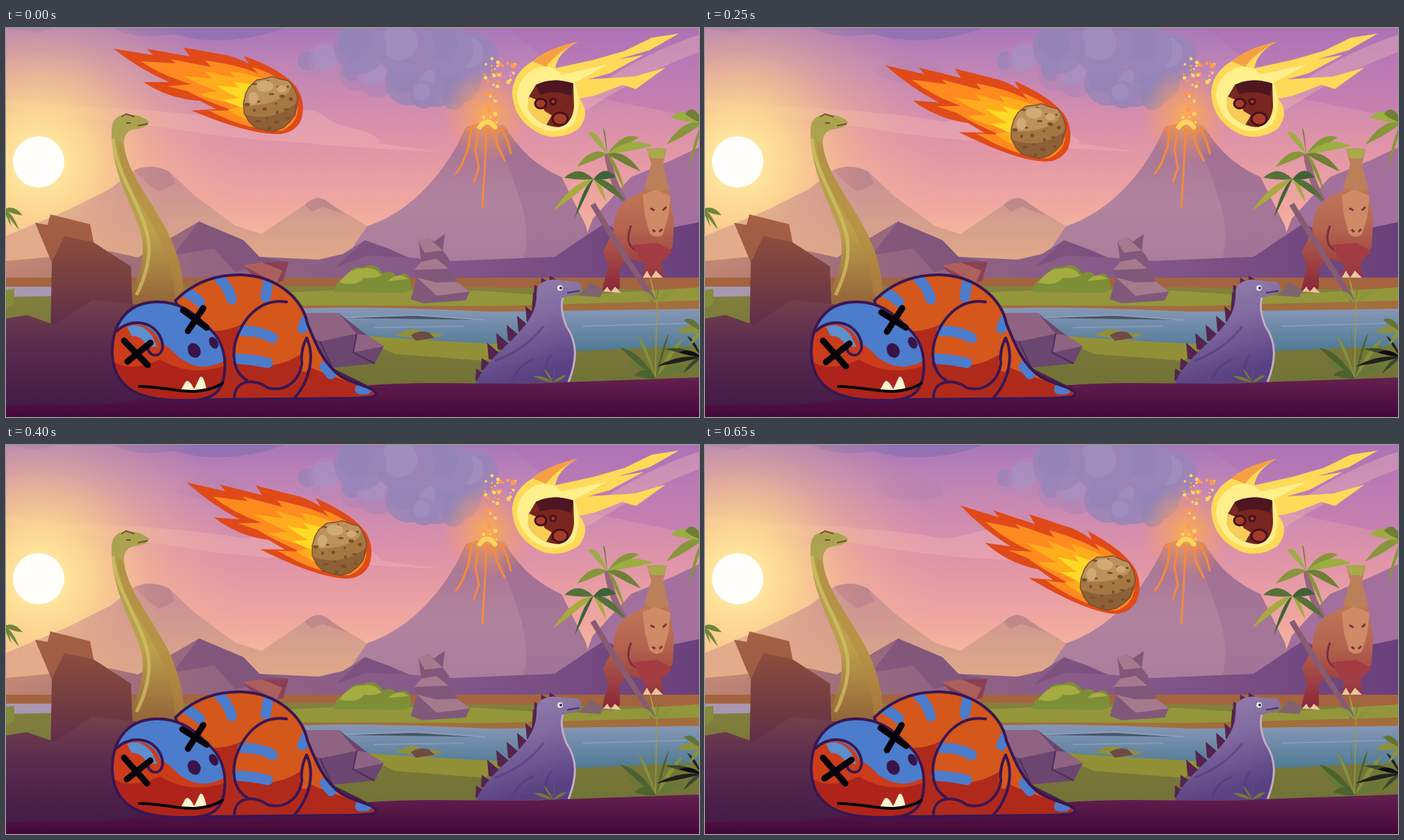
An HTML page for the animation above (750 ms loop, 998x561 px).

```html
<!DOCTYPE html>
<html lang="en">
<head>
<meta charset="utf-8">
<title>Last day of the dinosaurs</title>
<style>
html, body { margin: 0; width: 100%; height: 100%; overflow: hidden; background: #4a0b3e; }
svg { display: block; width: 100vw; height: 100vh; }
.line { fill: none; stroke: #3a1652; stroke-width: 4; stroke-linecap: round; stroke-linejoin: round; }
.stripe { fill: none; stroke: #4c7ccc; stroke-width: 15; stroke-linecap: round; }
.ink { fill: none; stroke: #050208; stroke-linecap: round; }
</style>
</head>
<body>
<svg viewBox="0 0 998 561" preserveAspectRatio="none">
<defs>
  <linearGradient id="sky" x2="0" y2="1">
    <stop offset="0" stop-color="#a878b8"/><stop offset=".1" stop-color="#c084b6"/>
    <stop offset=".3" stop-color="#e094a8"/><stop offset=".46" stop-color="#f0a8a0"/><stop offset=".6" stop-color="#f6c298"/>
  </linearGradient>
  <radialGradient id="glow">
    <stop offset="0" stop-color="#fff3b0"/><stop offset=".25" stop-color="#ffe094" stop-opacity=".85"/>
    <stop offset=".55" stop-color="#fbc888" stop-opacity=".4"/><stop offset="1" stop-color="#f6b090" stop-opacity="0"/>
  </radialGradient>
  <radialGradient id="fireGlow">
    <stop offset="0" stop-color="#ffb04a" stop-opacity=".9"/><stop offset="1" stop-color="#ff9a5a" stop-opacity="0"/>
  </radialGradient>
  <linearGradient id="far" x2="0" y2="1">
    <stop offset="0" stop-color="#c88e96"/><stop offset="1" stop-color="#e0aa88"/>
  </linearGradient>
  <linearGradient id="volcano" x2="0" y2="1">
    <stop offset="0" stop-color="#a7708f"/><stop offset=".55" stop-color="#b1839e"/><stop offset="1" stop-color="#a97d9c"/>
  </linearGradient>
  <linearGradient id="hill">
    <stop offset="0" stop-color="#bb8070"/><stop offset=".28" stop-color="#946680"/><stop offset=".6" stop-color="#85598a"/><stop offset="1" stop-color="#69407b"/>
  </linearGradient>
  <linearGradient id="river" x2="0" y2="1">
    <stop offset="0" stop-color="#8797b6"/><stop offset="1" stop-color="#4f7a94"/>
  </linearGradient>
  <linearGradient id="grass" x2="0" y2="1">
    <stop offset="0" stop-color="#85813f"/><stop offset="1" stop-color="#6f7135"/>
  </linearGradient>
  <linearGradient id="shade" x2="0" y2="1">
    <stop offset="0" stop-color="#73404c"/><stop offset=".4" stop-color="#592b4e"/><stop offset="1" stop-color="#3e1846"/>
  </linearGradient>
  <linearGradient id="cliff" x2="0" y2="1">
    <stop offset="0" stop-color="#97553f"/><stop offset=".5" stop-color="#79403f"/><stop offset="1" stop-color="#582b4d"/>
  </linearGradient>
  <linearGradient id="front" x2="0" y2="1">
    <stop offset="0" stop-color="#64204f"/><stop offset="1" stop-color="#43083b"/>
  </linearGradient>
  <linearGradient id="neck" x2="0" y2="1">
    <stop offset="0" stop-color="#a9a350"/><stop offset=".6" stop-color="#bca04d"/><stop offset="1" stop-color="#916037"/>
  </linearGradient>
  <linearGradient id="spiny" x2=".3" y2="1">
    <stop offset="0" stop-color="#9a83b0"/><stop offset=".5" stop-color="#806a9f"/><stop offset="1" stop-color="#594083"/>
  </linearGradient>
  <linearGradient id="brute" x2="0" y2="1">
    <stop offset="0" stop-color="#c98a5a"/><stop offset=".55" stop-color="#b66450"/><stop offset="1" stop-color="#8a2638"/>
  </linearGradient>
  <clipPath id="headClip"><path id="headShape" d="M153 470C152 430 172 396 216 395C249 394 270 410 289 430C307 444 317 466 315 494C313 523 300 536 266 537C214 538 156 533 153 470Z"/></clipPath>
  <clipPath id="bodyClip"><path id="bodyShape" d="M244 393C273 364 307 355 340 356C391 358 427 391 434 426C447 459 459 486 482 502C500 514 532 518 533 527C533 535 510 533 490 534L290 536Z"/></clipPath>
  <clipPath id="rockClip"><path id="rockShape" d="M-31-24L-20-34L-8-36L2-39L15-35L26-33L34-22L39-10L38 4L35 17L27 27L18 35L4 40L-9 38L-22 35L-31 26L-38 14L-39 0L-36-14Z"/></clipPath>
</defs>

<!-- sky -->
<rect width="998" height="561" fill="url(#sky)"/>
<path d="M998 0V130L850 100L720 0Z" fill="#b36bb0" opacity=".38"/>
<g fill="#f7c0b8" opacity=".32">
  <path d="M0 104C120 118 260 112 420 150L620 178C430 172 190 140 0 112Z"/>
  <path d="M190 135C230 120 300 140 350 134S430 105 460 128S520 140 540 165C440 170 300 160 190 135Z"/>
  <path d="M825 105C875 60 950 25 998 10V35C940 55 880 90 825 125Z"/>
</g>
<path d="M155 0C190 18 220 10 245 9C290 25 360 17 400 0ZM0 0H70L45 7Z" fill="#8c6faf" opacity=".75"/>
<path d="M245 68C250 48 270 52 276 38C290 24 315 34 315 50C330 46 344 58 343 72C315 86 270 80 245 68Z" fill="#b882b0" opacity=".6"/>
<circle cx="47" cy="193" r="290" fill="url(#glow)"/>
<g id="smoke"></g>

<!-- mountains -->
<path d="M0 300L90 262L150 232L185 205Q210 194 235 207L272 242L330 285L368 297L430 255Q449 236 468 254L520 286L560 340H0Z" fill="url(#far)"/>
<path d="M185 205Q210 194 235 207L244 225L220 236L203 224ZM430 255Q449 236 468 254L490 270L456 258L440 265Z" fill="#b57c88" opacity=".55"/>
<path d="M480 345L520 286C590 262 638 200 662 143Q690 132 718 141C740 178 767 201 800 215L835 285L850 345Z" fill="url(#volcano)"/>
<path d="M718 141C740 178 767 201 800 215L835 285L850 345H740C770 280 720 210 708 148Z" fill="#94658f" opacity=".4"/>
<path d="M820 340L845 275L900 215L960 190L998 172V345Z" fill="#a3709d"/>
<circle cx="693" cy="125" r="68" fill="url(#fireGlow)"/>
<g fill="none" stroke="#f58a3c" stroke-width="3" stroke-linecap="round">
  <path d="M664 147Q678 135 691 145T718 144M670 147L666 172L657 196L648 210M681 144L676 176L681 202L674 222M692 146L690 190L686 258M703 146L707 168L718 191M714 146L722 162L727 181"/>
  <path d="M682 143Q693 128 704 143" stroke="#ffd45a" stroke-width="7"/>
</g>
<g id="sparks"></g>
<path d="M0 336L150 322L190 331L242 300L278 279L342 306L365 330L450 334L485 326L517 306L550 318L580 331L645 336L790 330L830 303L862 282L900 300L998 280V372H0Z" fill="url(#hill)"/>
<path d="M278 279L342 306L365 330L400 336L330 352L300 318L240 328ZM517 306L550 318L580 331L520 328L475 345Z" fill="#6d4677" opacity=".45"/>
<circle cx="47" cy="193" r="190" fill="url(#glow)" opacity=".65"/>
<circle cx="47" cy="193" r="37" fill="#fffefa"/>

<!-- plain and river -->
<path d="M0 361H998V530H0Z" fill="url(#grass)"/>
<path d="M0 360H998V378L700 374L420 372L0 374Z" fill="#a4643f"/>
<path d="M0 373H90V386L0 388Z" fill="#a897b1"/>
<path d="M390 382L500 377L680 379L800 387L998 374V398L760 405L400 402Z" fill="#93963b"/>
<path d="M400 400L700 401L998 393V410L760 413L400 406Z" fill="#a26e3c"/>
<path d="M410 405C510 401 600 405 700 409L998 405V458L820 466C720 466 590 450 510 443L410 430Z" fill="url(#river)"/>
<path d="M470 418L590 414L690 421M530 432L660 430M830 430L980 426" stroke="#a2b4c8" stroke-width="2" opacity=".4"/>
<path d="M500 443C580 449 680 455 720 456L690 480L560 470ZM560 443L583 434L630 443L607 450Z" fill="#929037"/>
<path d="M583 443Q594 435 609 439L617 447L590 451Z" fill="#6d4c43"/>
<path d="M472 381Q475 360 490 361Q497 342 514 345Q532 336 543 354Q557 348 562 358Q579 348 582 364Q588 378 574 382Z" fill="#7e8e36"/>
<path d="M480 367Q495 346 514 347Q530 343 541 357Q530 362 516 360Q504 374 480 367ZM550 365Q565 350 580 362Z" fill="#a4ac42"/>
<path d="M583 391L592 360L588 349L598 337L594 308L608 302L616 308L632 297L629 321L638 333L637 347L650 366L668 380L662 393L600 397Z" fill="#80587a"/>
<path d="M594 308L608 302L629 321L603 324ZM598 337L620 333L637 347L588 349ZM592 360L620 367L650 366L668 380L620 386Z" fill="#a67a8d"/>
<path d="M340 342L369 338L407 337L399 365L370 371Z" fill="#8b4056"/><path d="M340 342L369 338L398 350L390 368Z" fill="#ac605e"/>
<path d="M409 418L430 411L479 411L520 443L544 459L531 484L470 490L400 486Z" fill="#6b4670"/>
<path d="M409 418L430 411L479 411L505 441L452 452L425 437ZM505 441L520 443L544 459L500 468Z" fill="#8f6482"/>
<path d="M452 452L470 490M505 441L500 468L531 484" fill="none" stroke="#4f2d5b" stroke-width="2"/>

<!-- left cliff and long neck -->
<path d="M173 403C181 371 201 350 196 304C189 267 151 214 152 148Q152 126 173 125Q191 123 206 135Q205 144 184 146Q168 150 170 169C174 209 213 254 233 295C252 334 257 365 257 405Z" fill="url(#neck)"/>
<path d="M170 169C174 209 213 254 233 295C252 334 257 365 257 405H244C244 344 222 302 197 260C177 228 162 196 160 162Z" fill="#b5863f" opacity=".5"/>
<path d="M154 160C158 211 196 255 205 305Q210 340 188 385" fill="none" stroke="#d8c465" stroke-width="5" opacity=".7"/>
<path d="M166 128L173 124L185 128M173 137H180M190 141L204 138" stroke="#6d5130" stroke-width="2" fill="none"/>
<path d="M42 281L60 284L64 269L121 283L126 309L180 344L182 398L170 445H64L66 338Z" fill="url(#cliff)"/>
<path d="M42 281L60 284L64 269L121 283L126 309L84 300L66 338Z" fill="#ad6848" opacity=".65"/>
<path d="M0 419L30 414L70 428L125 392L182 398L270 410L440 475L520 515V561H0Z" fill="url(#shade)"/>
<path d="M0 378L12 376L12 398L0 404Z" fill="#838c3a"/>

<!-- palms and horned dinosaur -->
<path d="M875 292Q873 262 898 245L920 234L929 196L923 174H951L946 196L955 235L962 278L960 316L943 335L947 357L917 359L920 340L900 333L884 344L884 376L858 380L867 344L860 322Z" fill="url(#brute)"/>
<path d="M917 241L935 233L957 242L954 271L946 298Q936 305 927 296L920 270Z" fill="#ce8b65"/>
<path d="M919 230L930 196L924 176Q938 170 951 176L946 197L955 232Q937 238 919 230Z" fill="#ba805a"/>
<path d="M923 176Q938 170 951 176L947 188H929Z" fill="#a9a84c"/>
<path d="M900 285Q888 318 915 323L934 318M875 300L888 322M928 260L934 263M951 258L946 263M931 291L935 294M945 290L941 294" fill="none" stroke="#7c303b" stroke-width="3"/>
<path d="M902 313L938 310L960 322L942 340L917 338Z" fill="#a43c43"/>
<path d="M860 380L866 373L871 381L877 373L886 382ZM917 360L923 350L929 360L936 350L946 360Z" fill="#ecc6a2"/>
<path d="M845 254Q875 305 933 393" fill="none" stroke="#875c72" stroke-width="8"/>
<path d="M866 181Q872 222 890 249" fill="none" stroke="#93667a" stroke-width="9"/>
<path d="M825 386L842 367L860 378L856 388Z" fill="#80636f"/>
<g id="palms"></g>

<!-- spiny dinosaur -->
<g id="spines" fill="#54244e"></g>
<path d="M676 514C694 473 730 456 753 421C767 400 763 384 765 374Q776 359 799 364L824 366Q833 374 824 383L802 389Q797 405 807 430C824 455 822 480 810 511Z" fill="url(#spiny)"/>
<path d="M802 389Q797 405 807 430C824 455 822 480 810 511" fill="none" stroke="#c2acc3" stroke-width="3"/>
<path d="M704 480Q748 464 774 430M730 508Q738 485 760 478M778 508Q773 485 786 470" fill="none" stroke="#513a79" stroke-width="3" opacity=".55"/>
<circle cx="798" cy="375" r="4" fill="#dff0e4"/><circle cx="799" cy="375" r="2" fill="#27324a"/>
<path d="M808 382L826 379" stroke="#4a2f60" stroke-width="2"/>
<g id="plants"></g>

<!-- foreground -->
<path d="M0 545C70 540 120 548 180 538C330 525 480 519 540 514C640 509 700 516 800 511L998 504V561H0Z" fill="url(#front)"/>

<!-- sleeping dinosaur -->
<use href="#bodyShape" fill="#d4571c"/>
<g clip-path="url(#bodyClip)">
  <path d="M290 437Q319 438 340 427L329 475Q380 500 425 470L440 490Q475 506 533 521V540H290Z" fill="#b02a1c"/>
  <path d="M392 397C350 396 331 430 329 470Q380 507 428 462L434 420Z" fill="#d4571c"/>
  <path class="stripe" d="M252 379Q268 383 279 395M306 360Q321 374 325 391M378 365L374 388M341 437Q365 436 384 447M333 477Q355 478 377 483M432 421L427 433M459 488L468 499M510 521H519"/>
  <ellipse cx="430" cy="484" rx="7" ry="12" fill="#d4571c"/>
</g>
<use href="#bodyShape" class="line"/>
<path class="line" d="M404 395C366 389 340 419 330 454C324 482 333 500 347 508M329 533C329 508 357 504 377 519C404 526 423 507 426 484Q424 464 433 447M433 447C445 473 438 508 415 534"/>
<use href="#headShape" fill="#cb3c1b"/>
<g clip-path="url(#headClip)">
  <path d="M150 478Q176 499 222 478Q266 505 318 486V540H150Z" fill="#ae241a"/>
  <path d="M150 440C153 390 218 374 263 404C300 428 322 454 314 480Q280 499 249 475Q232 457 222 454C210 423 177 420 150 440Z" fill="#4c7ccc"/>
  <path d="M174 431Q195 423 211 445L218 460L203 459Q196 444 181 444Z" fill="#5b8fd0"/>
</g>
<use href="#headShape" class="line"/>
<path class="line" d="M160 437C177 419 210 421 222 445C231 464 221 475 211 471Q201 466 207 457"/>
<ellipse cx="271" cy="465" rx="9" ry="11" transform="rotate(-28 271 465)" fill="#391449"/>
<ellipse cx="299" cy="454" rx="6" ry="9" transform="rotate(-28 299 454)" fill="#391449"/>
<path d="M251 524L258 511Q263 504 271 521L279 504Q284 498 289 522Z" fill="#fff4d2"/>
<path class="ink" stroke-width="4" d="M192 517C225 517 245 525 272 524Q298 522 312 512"/>
<path id="crosses" class="ink" stroke-width="9"/>

<!-- distant meteor -->
<path d="M729 94C730 62 757 45 780 40Q796 25 823 20Q795 35 791 58L846 46L891 33L930 14L969 8L927 32L882 45L918 39L870 65L838 74L905 70L950 57L907 88L888 82L849 97L826 102Q843 124 824 146Q789 168 758 146Q731 128 729 94Z" fill="#ffda58"/>
<path d="M736 96Q737 71 763 58Q786 51 800 67L866 53L819 79Q831 111 817 139Q790 157 763 141Q738 124 736 96Z" fill="#fff08c"/>
<path d="M758 48Q780 29 823 20Q790 38 778 56" fill="#f6a044"/>
<path d="M763 82Q787 70 817 80L818 113Q816 138 797 143Q772 142 761 126Q751 110 753 99Z" fill="#792520"/>
<path d="M763 82Q787 70 817 80L814 98Q791 88 769 96Z" fill="#4d1620"/>
<path d="M753 99L768 105L776 120L786 126L778 140Q756 131 751 114Z" fill="#f7cc57"/>
<g fill="#a53c2a" stroke="#43121c" stroke-width="3"><ellipse cx="798" cy="131" rx="11" ry="9"/><ellipse cx="770" cy="109" rx="8" ry="7"/><circle cx="788" cy="106" r="4"/></g>

<!-- falling meteor -->
<g id="meteor">
  <path d="M-226-79L-169-70L-178-79L-116-68L-126-81L-76-72Q-51-69-31-57L-39-69Q17-49 37-24Q52-1 44 24Q33 45 7 44Q-35 43-114 10L-78 8L-102-4Q-148-7-183-31L-146-31Q-188-49-226-79Z" fill="#e04a18"/>
  <path d="M-187-61L-136-58L-144-64L-86-53L-94-62Q-41-55-18-43L-27-53Q23-38 38-7Q45 25 17 39Q-31 40-89 10L-54 10Q-94-4-120-18L-148-25L-114-28Q-156-40-187-61Z" fill="#ff8a20"/>
  <path d="M-126-40L-84-36L-95-47L-51-37L-60-47Q4-38 20-18L-8 30Q-39 24-62 9L-39 3Q-81-4-104-14L-76-18Q-98-25-126-40Z" fill="#ffad1c"/>
  <path d="M-77-26L-45-23L-54-32L-20-26L-24 10Q-50 4-69-5L-45-8Q-60-14-77-26Z" fill="#ffd924"/>
  <use href="#rockShape" fill="#a67643"/>
  <g clip-path="url(#rockClip)">
    <path d="M-40-40H35L27-17Q9 2-40 4Z" fill="#bd915b"/>
    <path d="M-40 15Q6 29 40-4V42H-40Z" fill="#8e6036"/>
    <g id="pits" fill="#7a502e"></g>
    <g fill="#d0aa74"><ellipse cx="-8" cy="-25" rx="12" ry="8"/><ellipse cx="-25" cy="-8" rx="7" ry="9"/><ellipse cx="16" cy="-21" rx="7" ry="5"/></g>
  </g>
  <use href="#rockShape" fill="none" stroke="#7a502e" stroke-width="1.5"/>
</g>
</svg>
<script>
const el = id => document.getElementById(id);
const add = (id, markup) => el(id).insertAdjacentHTML('beforeend', markup);
const circle = (id, x, y, r, fill, alpha = 1) =>
  add(id, `<circle cx="${x}" cy="${y}" r="${r}" fill="${fill}" opacity="${alpha}"/>`);

let seed = 7;
const random = () => (seed = seed * 16807 % 2147483647) / 2147483647;

// A pointed leaf from its stalk to its tip, bowed upwards.
function leaf(id, x, y, tipX, tipY, bow, width, fill) {
  const mx = (x + tipX) / 2, my = (y + tipY) / 2 - bow;
  add(id, `<path d="M${x} ${y}Q${mx} ${my - width} ${tipX} ${tipY}Q${mx} ${my + width} ${x} ${y}" fill="${fill}"/>`);
}
function fan(id, x, y, tips, bow, width, fills) {
  tips.forEach(([tx, ty], i) => leaf(id, x, y, tx, ty, bow, width, fills[i % fills.length]));
}

[[438, 51, 22], [465, 48, 30], [505, 65, 26], [535, 70, 30], [580, 78, 34], [620, 84, 30],
 [650, 75, 34], [673, 42, 35], [635, 30, 38], [575, 28, 42], [510, 28, 38], [602, 96, 20], [645, 101, 17]]
  .forEach(([x, y, r], i) => {
    circle('smoke', x, y, r, i < 4 ? '#b487b6' : '#9885b8', i < 2 ? .45 : .82);
    circle('smoke', x - r * .2, y - r * .18, r * .62, i % 2 ? '#a395c4' : '#8f83b8', .55);
  });

for (let i = 0; i < 48; i++) {
  const rise = random() * 92, x = 698 + rise * .18 + (random() - .5) * (20 + rise * .35);
  circle('sparks', x, 136 - rise, 1 + random() * 2.3, random() < .5 ? '#ffd466' : '#ff9c4a');
}

const greens = ['#87963a', '#9cad42', '#707f35'];
fan('palms', 866, 182, [[822, 200], [838, 151], [860, 145], [911, 158], [931, 170], [914, 207], [892, 237]], 10, 12, greens);
fan('palms', 846, 218, [[788, 264], [804, 216], [819, 274], [865, 252], [892, 250], [878, 215]], 9, 12, ['#a8aa3d', '#54713b', '#3f6239']);
fan('palms', 1004, 137, [[951, 168], [957, 129], [978, 124], [982, 206]], 10, 14, greens);
fan('palms', -3, 262, [[24, 270], [19, 291], [8, 287]], 5, 8, ['#72863b']);
fan('palms', 936, 396, [[917, 381], [927, 359], [943, 363], [960, 381]], 4, 8, greens);

const spines = [[681, 499], [689, 484], [700, 468], [713, 454], [728, 442], [743, 429], [755, 415], [762, 402], [763, 389], [765, 378], [775, 368], [787, 365]];
spines.forEach(([x, y], i) => {
  const s = i < 2 ? 8 : i < 7 ? 14 : 8;
  add('spines', `<path d="M${x - 5} ${y + 9}L${x - s * .5} ${y - s}L${x + 12} ${y + 2}L${x + 8} ${y + 13}Z"/>`);
});

fan('plants', 936, 505, [[895, 482], [884, 461], [910, 444], [929, 430], [955, 440], [976, 448], [981, 489], [905, 501]], 8, 11, ['#667837', '#4c622f', '#83913c']);
fan('plants', 1002, 475, [[937, 488], [949, 463], [969, 468], [981, 444], [975, 498]], 5, 7, ['#1d211d', '#36492d', '#0d0d12']);
fan('plants', 1004, 438, [[966, 439], [976, 421], [984, 459]], 7, 10, ['#8c9139', '#647333']);
fan('plants', 788, 511, [[760, 502], [774, 491], [790, 489], [807, 501]], 1, 5, ['#747b38']);
add('plants', '<path d="M938 390L935 503" stroke="#a29a45" stroke-width="2" opacity=".7"/>');

for (let i = 0; i < 22; i++) {
  const a = i * 2.4, r = 8 * Math.sqrt(i + 1);
  add('pits', `<ellipse cx="${r * Math.cos(a)}" cy="${r * Math.sin(a)}" rx="${2 + i % 3}" ry="${1.5 + i % 2}"/>`);
}

const poses = [
  { move: 'translate(381 109)', eyes: 'M170 451L204 486M208 454L175 481M255 407L289 432M284 404L262 437' },
  { move: 'translate(480 148) rotate(3.9)', eyes: 'M170 451L203 488M208 455L174 482M254 410L289 432M284 404L262 438' },
  { move: 'translate(580 198) rotate(8.3)', eyes: 'M170 451L202 488M211 454L172 481M253 408L290 434M283 404L262 440' }
];
function draw() {
  const pose = poses[Math.floor(performance.now() / 250) % poses.length];
  el('meteor').setAttribute('transform', pose.move);
  el('crosses').setAttribute('d', pose.eyes);
  requestAnimationFrame(draw);
}
draw();
</script>
</body>
</html>
```
